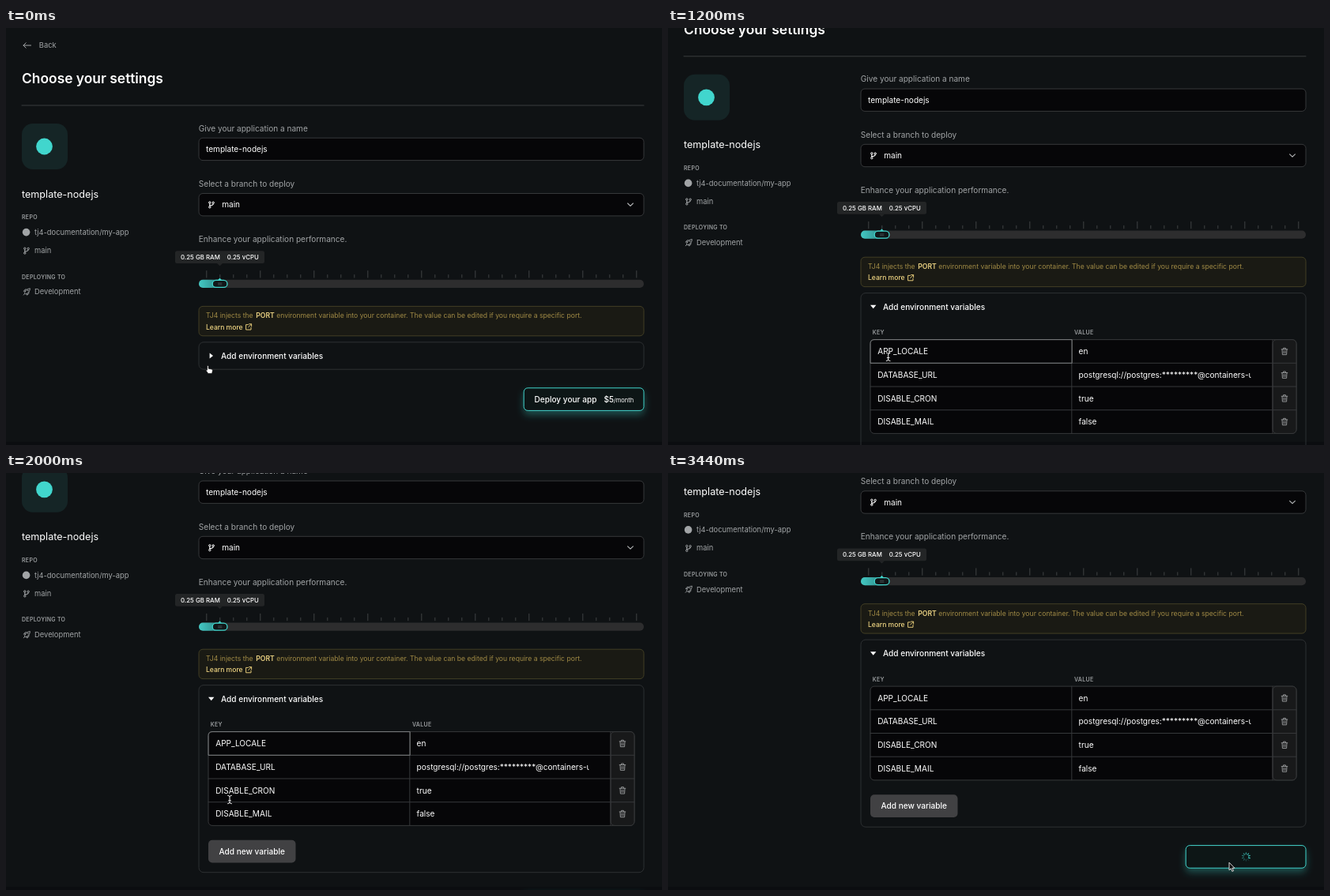
An HTML page for the animation above (3590 ms loop, 830x528 px).

```html
<!DOCTYPE html>
<html lang="en">
<head>
<meta charset="utf-8">
<title>Choose your settings</title>
<style>
html, body { margin: 0; width: 100%; height: 100%; overflow: hidden; background: #0f1214; }
svg { display: block; }
text { font-family: Inter, "Noto Sans", sans-serif; font-optical-sizing: none; white-space: pre; }
.line { fill: none; stroke-linecap: round; stroke-linejoin: round; }
</style>
</head>
<body>
<svg id="stage" width="830" height="528" viewBox="0 0 830 528"></svg>
<script>
const LOOP = 3590, ROW = 29.7, TOP = 456.8;
const GREY = '#a1a4a6', WHITE = '#fff', TEAL = '#41d6cd', EDGE = '#36383a', GOLD = '#a08a45';

const txt = (x, y, s, size = 10.08, fill = WHITE, weight = 400, extra = '') =>
  `<text x="${x}" y="${y}" font-size="${size}" fill="${fill}" font-weight="${weight}" ${extra}>${s}</text>`;
const caps = (x, y, s) => txt(x, y, s, 7, '#999c9e', 600, 'letter-spacing=".3"');
const box = (x, y, w, h, fill, stroke = 'none', r = 5, extra = '') =>
  `<rect x="${x}" y="${y}" width="${w}" height="${h}" rx="${r}" fill="${fill}" stroke="${stroke}" ${extra}/>`;
const line = (d, stroke, w = 1, extra = '') =>
  `<path class="line" d="${d}" stroke="${stroke}" stroke-width="${w}" ${extra}/>`;
const group = (id, s) => `<g id="${id}">${s}</g>`;
const range = (n, f) => Array.from({ length: n }, (_, i) => f(i)).join('');

const branch = (x, y, c) => `<g transform="translate(${x} ${y})">` +
  line('M-2.2-1.6V2M2.2-1.4Q2.2.8-2.2 1', c, 1.1) +
  [[-2.2, -2.8], [-2.2, 3], [2.2, -2.6]].map(([a, b]) =>
    `<circle cx="${a}" cy="${b}" r="1.2" fill="none" stroke="${c}"/>`).join('') + '</g>';

const rocket = line('M23.6 335.2q2-5 6.8-5.4q-.2 5-5.2 7.2zM24.4 333l-2 .4 1.6-2.2 2-.2M26.8 336.2l-.2 2 2-1.6.4-2M22.2 338l1.6-1.6', GREY, .9) +
  '<circle cx="27.8" cy="332.4" r=".8" fill="' + GREY + '"/>';

const trash = y => line(`M776.2 ${y - 2.6}h7.6M778.6 ${y - 2.8}v-1.4h2.8v1.4M777 ${y - 2.4}l.4 6.6h5.2l.4-6.6M779 ${y - .6}v3M781 ${y - .6}v3`, '#9b9d9f', .9);

const ticks = range(33, i => {
  const x = 253.8 + i * 17;
  return line(`M${x} ${i % 4 ? 312.5 : 307.5}V316`, '#46484a', .9, 'stroke-linecap="butt"');
});

const vars = [
  ['APP_LOCALE', 'en'],
  ['DATABASE_URL', 'postgresql://postgres:*********@containers-us-'],
  ['DISABLE_CRON', 'true'],
  ['DISABLE_MAIL', 'false']
];
const row = ([key, value], i) => {
  const y = TOP + i * ROW, base = y + 18.6;
  return `<g class="row">` +
    (i ? line(`M256 ${y}H795`, EDGE) : '') + trash(y + ROW / 2) +
    `<g class="entry">${txt(265.2, base, key)}<svg x="515" y="${y}" width="222.5" height="${ROW}">` +
    txt(4.6, 18.6, value) + '</svg></g></g>';
};

const page =
  line('M31.5 22H22M25.2 18.8L22 22l3.2 3.2', GREY) +
  txt(41.8, 25.4, 'Back', 9.4, GREY) +
  txt(20, 70.2, 'Choose your settings', 17.4, WHITE, 600) +
  line('M20 98H807', '#393c3e') +

  box(20, 121, 58, 58, '#152526', 'none', 14) +
  `<circle cx="48.5" cy="150" r="10.4" fill="${TEAL}"/>` +
  txt(20, 214.6, 'template-nodejs', 12.6) +
  caps(20, 242.3, 'REPO') +
  `<circle cx="25.6" cy="258.6" r="4.8" fill="${GREY}"/>` +
  txt(36, 262, 'tj4-documentation/my-app', 9.4, GREY) +
  branch(26, 282, GREY) + txt(36, 285.2, 'main', 9.4, GREY) +
  caps(20, 317.7, 'DEPLOYING TO') +
  rocket + txt(36, 337.4, 'Development', 9.4, GREY) +

  txt(243.8, 130.7, 'Give your application a name', 10.08, GREY) +
  box(244, 139.2, 563, 28.4, '#060608', EDGE) +
  txt(253, 157.2, 'template-nodejs') +
  txt(243.8, 201, 'Select a branch to deploy', 10.08, GREY) +
  box(244, 209.5, 563, 28.4, '#060608', EDGE) +
  branch(260, 223.8, WHITE) + txt(273.2, 227.4, 'main') +
  line('M786.6 222l3.4 3.4 3.4-3.4', '#b5b7b9', 1.1) +

  txt(243.8, 271.2, 'Enhance your application performance.', 10.08, GREY) +
  box(214, 282.3, 113, 15.7, '#232526', 'none', 2.5) +
  '<path d="M267 298h7l-3.5 3.2z" fill="#232526"/>' +
  txt(221, 293, '0.25 GB RAM', 7.85, WHITE, 500) +
  txt(279.8, 293, '0.25 vCPU', 7.85, WHITE, 500) +
  ticks +
  box(244, 318.8, 563, 10.2, '#2d2d2e', 'none', 5.1) +
  box(244, 318.8, 32, 10.2, 'url(#fill)', 'none', 5.1) +
  `<path d="M268.2 319l2.3-2.6 2.3 2.6z" fill="${TEAL}"/>` +
  box(261.2, 319.4, 18.8, 9, '#111719', TEAL, 4.5, 'stroke-width="1.3"') +
  line('M268.5 323.1h4.4M268.5 324.9h4.4', '#4b5658', .8) +

  box(244, 352.4, 563, 37.4, '#1a1a14', '#423e24') +
  txt(253, 367.3, 'TJ4 injects the', 8.65, GOLD) +
  txt(316.2, 367.3, 'PORT', 8.65, '#ecd383', 600) +
  txt(342.2, 367.3, 'environment variable into your container. The value can be edited if you require a specific port.', 8.65, GOLD) +
  txt(253, 381.7, 'Learn more', 8.55, '#f0d683', 500) +
  line('M306.4 375.6H303.6V382H310V379.2M307.6 374.8H310.6V377.8M310.4 375L306.6 378.8', '#e3c978') +

  box(244, 397.8, 563, 34.4, 'none', '#2d3032', 6, 'id="panel"') +
  '<path id="mark" fill="#fff"/>' +
  txt(272, 418.8, 'Add environment variables', 10.08, WHITE, 500) +
  group('details',
    caps(258.8, 450.4, 'KEY') + caps(514, 450.4, 'VALUE') +
    box(256, TOP, 539, ROW, '#060608', EDGE, 5, 'class="table"') +
    box(765, TOP, 30, ROW, '#18191a', EDGE, 5, 'class="table"') +
    vars.map(row).join('') +
    line('', EDGE, 1, 'id="columns"') +
    line(`M510.8 ${TOP}H261q-5 0-5 5v${ROW - 5}H510.8z`, '#7b7d7f', 1, 'id="focus"') +
    line(`M265.6 ${TOP + 9}v12`, '#d8d8d8', .9, 'id="caret"') +
    group('add', box(256, 504.8, 110.5, 28.8, '#414143') +
      txt(269.5, 522.8, 'Add new variable', 10.08, WHITE, 500))) +
  group('deploy',
    box(655.2, 455.8, 151.8, 28.6, '#0f1315', TEAL, 5, 'filter="url(#glow)"') +
    group('label',
      txt(668.5, 473.8, 'Deploy your app', 10.08, WHITE, 500) +
      txt(756.6, 473.8, '$5', 10.08, WHITE, 500) + txt(769, 473.8, '/month', 7.5)) +
    group('spinner', range(10, i =>
      line('M0-3.3V-5.1', TEAL, 1.3, `transform="rotate(${i * 36})" opacity="${.15 + i * .09}"`))));

const cursors =
  `<path id="hand" d="M-3-4.6c0-1.2 1.7-1.2 1.7 0v2.8l4 .8q1.3.3 1.2 1.6l-.4 2.4-.6 1.6h-4.6l-2.2-3.2c-1-1.2.2-1.9.9-1.2z" fill="#fff" stroke="#111" stroke-width=".7"/>` +
  group('beam', line('M-2.4-5.2Q0-5 0-3.6Q0-5 2.4-5.2M0-3.8V3.8M-2.4 5.2Q0 5 0 3.6Q0 5 2.4 5.2M-1.4 1.2H1.4', '#eee', 1)) +
  '<path id="arrow" d="M0 0V9.6l2.2-2 1.6 3.6 1.7-.7-1.6-3.5h3z" fill="#111" stroke="#eee" stroke-width=".9"/>';

const $ = id => document.getElementById(id);
$('stage').innerHTML = `<defs>
  <linearGradient id="fill"><stop stop-color="#43c9c4"/><stop offset=".5" stop-color="#37a29f"/><stop offset="1" stop-color="#1c4b4c"/></linearGradient>
  <filter id="glow" x="-10%" y="-30%" width="120%" height="210%"><feDropShadow dx="0" dy="5" stdDeviation="5" flood-color="#2fb5ac" flood-opacity=".38"/></filter>
  </defs>` + box(0, 524, 830, 4, '#0b0d10', 'none', 0) + group('page', page) + group('cursor', cursors);

const show = (el, on) => el.setAttribute('visibility', on ? 'inherit' : 'hidden');
const move = (id, x, y, more = '') => $(id).setAttribute('transform', `translate(${x} ${y}) ${more}`);

// Linear interpolation through [time, value] points
function along(t, points) {
  let [t0, v0] = points[0];
  for (const [t1, v1] of points) {
    if (t < t1) return v0 + (v1 - v0) * (t - t0) / (t1 - t0);
    [t0, v0] = [t1, v1];
  }
  return v0;
}

const scrollPath = [[0, 0], [400, 0], [500, 13], [600, 35.6], [700, 54], [800, 62.2], [1400, 62.2],
  [1500, 70.8], [1700, 87], [1900, 112], [2000, 129.2], [2100, 160], [2200, 186.7]];
const cursorX = [[0, 257.5], [200, 270.5], [700, 270], [1000, 270], [1300, 283], [2200, 283], [2400, 691.5], [2700, 691.5], [3100, 710]];
const cursorY = [[0, 433], [200, 427], [600, 427], [700, 422], [1000, 422], [1300, 413.5], [2200, 413.5], [2400, 487], [2700, 487], [3100, 493.2]];

function draw(t) {
  const open = t >= 300, filled = t >= 1000, busy = t >= 2700;
  const rows = filled ? 4 : 1, grow = (rows - 1) * ROW;

  move('page', 0, -along(t, scrollPath));
  $('panel').setAttribute('height', open ? 148 + grow : 34.4);
  $('mark').setAttribute('d', open ? 'M256 413h7.4l-3.7 4.4z' : 'M257.6 411.4v7.2l4.4-3.6z');
  show($('details'), open);
  document.querySelectorAll('.table').forEach(el => el.setAttribute('height', rows * ROW));
  document.querySelectorAll('.row').forEach((el, i) => show(el, i < rows));
  document.querySelectorAll('.entry').forEach(el => show(el, filled));
  $('columns').setAttribute('d', `M510.8 ${TOP}v${rows * ROW}M765 ${TOP}v${rows * ROW}`);
  show($('focus'), t < 2300);
  show($('caret'), t >= 700 && !filled);
  // Hidden parents hide inherited children only, so gate these on the panel too
  if (!open) ['focus', 'caret'].forEach(id => show($(id), false));
  if (!open) document.querySelectorAll('.row, .entry').forEach(el => show(el, false));
  move('add', 0, grow);
  move('deploy', 0, open ? 113.4 + grow : 0);

  show($('label'), !busy);
  show($('spinner'), busy);
  move('spinner', 731.4, 470.2, `rotate(${Math.floor(t / 100) * 36})`);

  move('cursor', along(t, cursorX), along(t, cursorY));
  const beam = t >= 700 && t < 2300;
  show($('beam'), beam);
  show($('arrow'), busy);
  show($('hand'), !beam && !busy);
}

const start = performance.now();
function tick() {
  const t = (performance.now() - start) % LOOP;
  draw(t >= 3440 ? 3440 : Math.min(3300, Math.floor(t / 100) * 100));
  requestAnimationFrame(tick);
}
tick();
</script>
</body>
</html>
```
